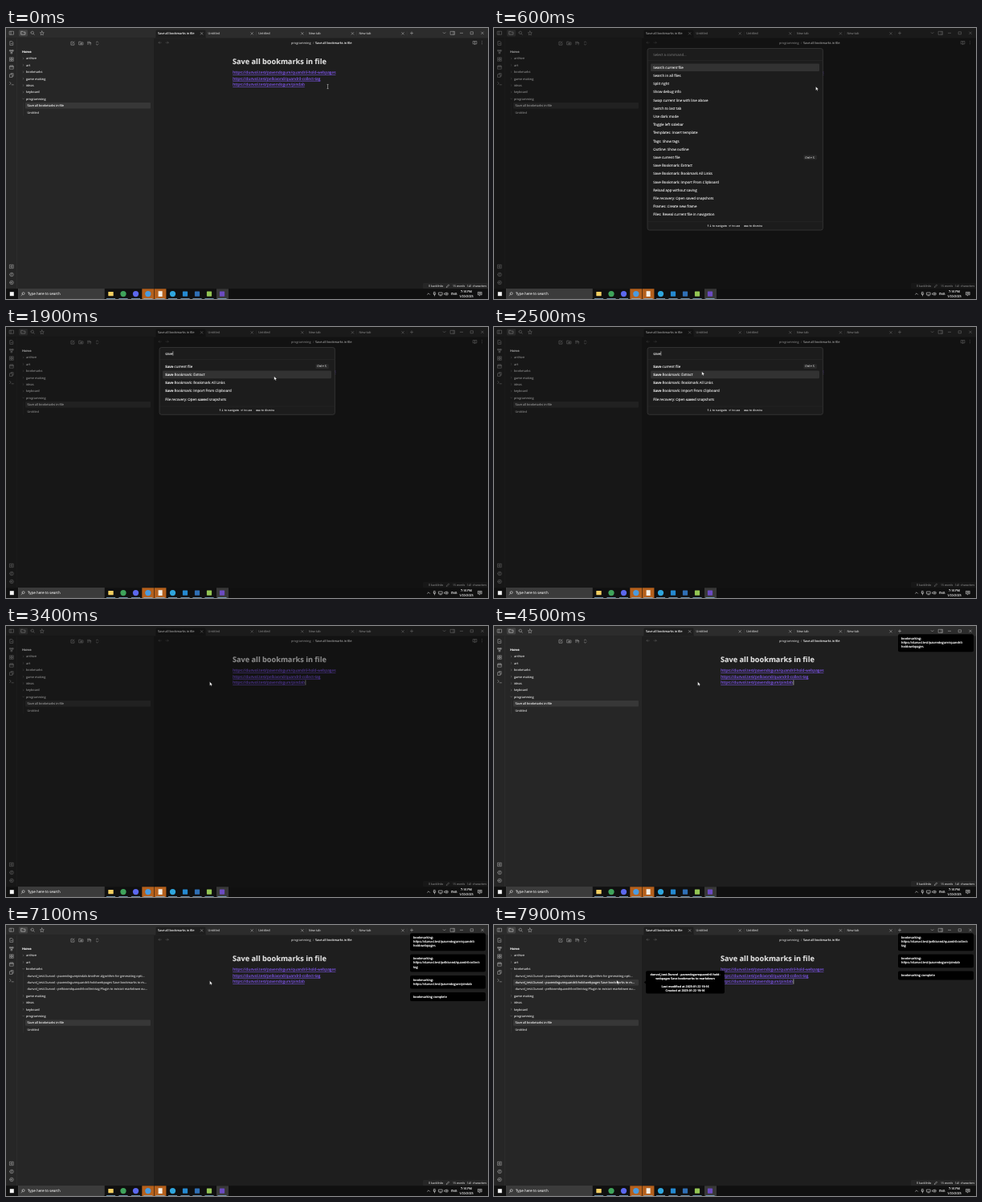
An HTML page that plays this animation: 600x338 px, repeating every 8 s.

```html
<!DOCTYPE html>
<html lang="en">
<head>
<meta charset="utf-8">
<title>Bookmarking links from a note</title>
<style>
  html, body { margin: 0; width: 100%; height: 100%; overflow: hidden; background: #1e1e1e; }
  svg { display: block; width: 100vw; height: 100vh; }
  text {
    font-family: "Open Sans", "Noto Sans", "DejaVu Sans", sans-serif;
    text-rendering: geometricPrecision; white-space: pre;
    stroke: currentColor; stroke-width: .11; fill: currentColor;
  }
  .bold { font-weight: 700; }
  .icon { fill: none; stroke: #b4b4b4; stroke-width: .52; stroke-linecap: round; stroke-linejoin: round; }
</style>
</head>
<body>
<svg id="stage" viewBox="0 0 600 338"></svg>
<script>
const LOOP = 8000, ROW = 8.4, ITEM = 10.2;
const UI = 3.86, BODY = 4.77, MENU = 4.45;

const text = (x, y, s, size = UI, color = '#d0d0d0', extra = '') =>
  `<text x="${x}" y="${y}" font-size="${size}" color="${color}" ${extra}>${s}</text>`;
const rect = (x, y, w, h, fill, r = 0, extra = '') =>
  `<rect x="${x}" y="${y}" width="${w}" height="${h}" rx="${r}" fill="${fill}" ${extra}/>`;
const dot = (x, y, r, fill) => `<circle cx="${x}" cy="${y}" r="${r}" fill="${fill}"/>`;
const icon = (x, y, d, extra = '') =>
  `<path class="icon" transform="translate(${x} ${y})" d="${d}" ${extra}/>`;
const group = (id, content = '') => `<g id="${id}">${content}</g>`;

const CROSS = 'M-1.3-1.3L1.3 1.3M1.3-1.3L-1.3 1.3';
const PLUS = 'M-1.6 0H1.6M0-1.6V1.6';
const FOLDER = 'M-2.4-1.9h1.7l.7.8h2.4v3h-4.8z';
const RIGHT = 'M-.5-.9L.5 0L-.5 .9';
const DOWN = 'M-.9-.5L0 .5L.9-.5';
const PANEL = 'M-2.5-2h5v4h-5z';
const SHEET = 'M-1.8-2.4h2.3l1.3 1.3v3.5h-3.6z';
const RING = 'M-2.3 0a2.3 2.3 0 1 0 4.6 0a2.3 2.3 0 1 0-4.6 0';

// Stand-in addresses
const HOST = 'https://dunvol.test/';
const USER = 'pavendogure', OTHER = 'pelkivond';
const REPO = 'quandril-hold-webpages', REF = 'quandril-collect-tag', TOOL = 'pindab';
const SITE = 'dunvol_test.Dunvol - ';
const links = [`${USER}/${REPO}`, `${OTHER}/${REF}`, `${USER}/${TOOL}`].map(s => HOST + s);
const saved = {
  tool: `${SITE}${USER}${TOOL} Another algorithm for generating opti...`,
  keep: `${SITE}${USER}${REPO} Save bookmarks to m...`,
  ref: `${SITE}${OTHER}${REF} Plugin to extract markdown ou...`
};
const NOTE = 'Save all bookmarks in file';

function titleBar() {
  const tabs = [NOTE, 'Untitled', 'Untitled', 'New tab', 'New tab'];
  return rect(0, 0, 600, 12.5, '#2c2c2c') +
    rect(16, 2.2, 11, 8.2, '#424242', 1.4) +
    icon(7, 6.2, PANEL + 'M-.9-2v4') + icon(21.5, 6.2, FOLDER, 'style="stroke:#e0e0e0"') +
    icon(33, 6.2, 'M-2-.4a1.7 1.7 0 1 0 3.4 0a1.7 1.7 0 1 0-3.4 0M1 .9L2.3 2.2') +
    icon(44.8, 6.4, 'M0-2.5L.8-.8L2.5-.6L1.2.6L1.5 2.4L0 1.5L-1.5 2.4L-1.2.6L-2.5-.6L-.8-.8z') +
    '<path d="M185 12.5q1.5 0 1.5-1.5V4q0-1.5 1.5-1.5h59q1.5 0 1.5 1.5v7q0 1.5 1.5 1.5z" fill="#1e1e1e"/>' +
    tabs.map((s, i) => {
      const x = 189 + i * 62.6;
      return text(x, 8.3, s, UI, i ? '#b8b8b8' : '#ececec') + icon(x + 54.6, 6.8, CROSS) +
        (i ? rect(x + 59.5, 4, .4, 5.5, '#444') : '');
    }).join('') +
    icon(505, 6.4, PLUS) + icon(545.6, 6.3, 'M-1.4-.7L0 .7L1.4-.7') +
    icon(556, 6.3, PANEL + 'M.9-2v4') + icon(567, 6.3, 'M-1.6 0H1.6') +
    icon(580, 6.3, 'M-1.5-1.5h3v3h-3z') + icon(593, 6.3, CROSS);
}

function sideBar() {
  const ribbon = [
    [19, SHEET + 'M-.7 .3h1.5'],
    [29.5, 'M-2.2-2h1.4v1.4h-1.4zM.8-2h1.4v1.4H.8zM-.7 1h1.4v1.4h-1.4zM-.8-1.3H.8M-1.5-.6L-.2 1M1.5-.6L.2 1'],
    [39, 'M-2.2-2.2h1.8v1.8h-1.8zM.5-2.2h1.8v1.8H.5zM-2.2 .5h1.8v1.8h-1.8zM.5 .5h1.8v1.8H.5z'],
    [49, 'M-2.2-1.8h4.4v4h-4.4zM-2.2-.5h4.4M-1-2.5v1M1-2.5v1'],
    [59, 'M-2.1-1.2h3v3.6h-3zM-.9-1.2v-1.2h3v3.6H.9'],
    [69, 'M-2.3-1.6L-.8 0L-2.3 1.6M.2 1.8H2.3'],
    [297.5, 'M-2.2-2.2h4.4v4.4h-4.4zM-1 0a1 1 0 1 0 2 0a1 1 0 1 0-2 0'],
    [307.5, RING + 'M-.7-.6q.7-1 1.3-.2q.2.6-.6 1M0 1.1v.1'],
    [317.5, RING + 'M-.8 0a.8.8 0 1 0 1.6 0a.8.8 0 1 0-1.6 0']
  ];
  const tools = [
    [83, 'M.3-1.8h-2.4v4h4V-.2M-.6.7L2-2'],
    [93.5, FOLDER + 'M0-.4v1.8M-.9.5h1.8'],
    [103.5, 'M-2-1.7h3M-2-.3h2M-2 1.1h1M1.6-.8v2.8M.7-.1L1.6-1L2.4-.1'],
    [113.5, 'M-1.2-1L0-2.2L1.2-1M-1.2 1L0 2.2L1.2 1']
  ];
  return rect(0, 12.5, 184, 313, '#262626') + rect(13.3, 12.5, .4, 313, '#363636') +
    ribbon.map(([y, d]) => icon(7, y, d)).join('') +
    tools.map(([x, d]) => icon(x, 19, d)).join('') +
    text(20, 30.8, 'Home', UI, '#ececec', 'class="bold"') + group('tree');
}

function folder(name, y, open) {
  return icon(21.6, y, open ? DOWN : RIGHT, 'style="stroke-width:.4;stroke:#8a8a8a"') + text(25, y + 1.45, name);
}

function fileRow(name, y, back) {
  return (back ? rect(24, y - 3.7, 156, 7.5, back, 1) : '') +
    text(26.5, y + 1.45, name, UI, back ? '#ececec' : '#c8c8c8');
}

const guide = (y, n) => rect(21.5, y + 4.2, .35, n * ROW, '#3c3c3c');

function tree(count, hover) {
  const names = ['archive', 'art', 'bookmarks', 'game making', 'ideas', 'keyboard', 'programming'];
  const { tool, keep, ref } = saved;
  const kids = [[], [keep], [keep, ref], [tool, keep, ref]][count];
  const at = i => 38 + i * ROW + (i > 2 ? count * ROW : 0);
  return guide(at(2), count) + guide(at(6), 2) +
    names.map((s, i) => folder(s, at(i), i === 6 || (i === 2 && count > 0))).join('') +
    kids.map((s, i) => fileRow(s, at(2) + (i + 1) * ROW, hover && i === 1 ? '#363636' : '')).join('') +
    fileRow(NOTE, at(6) + ROW, '#373737') + fileRow('Untitled', at(6) + 2 * ROW);
}

function editor() {
  return icon(191.6, 18.2, 'M1.6 0H-1.6M-.4-1.2L-1.6 0L-.4 1.2', 'opacity=".4"') +
    icon(200.6, 18.2, 'M-1.6 0H1.6M.4-1.2L1.6 0L.4 1.2', 'opacity=".4"') +
    text(355, 19.5, 'programming', UI, '#b0b0b0') + text(382, 19.5, '/', UI, '#777') +
    text(385, 19.5, NOTE, UI, '#ececec') +
    icon(583.6, 18.3, 'M0-1.4v3.4M0-1.4q-1-.7-2.3-.4v3.4q1.3-.3 2.3.4q1-.7 2.3-.4v-3.4q-1.3-.3-2.3.4') +
    [-1.6, 0, 1.6].map(d => dot(592.5, 18.3 + d, .4, '#bbb')).join('') +
    text(282, 45, NOTE, 9.17, '#e0e0e0', 'class="bold"') +
    links.map((s, i) => text(282.3, 57.4 + i * 7.5, s, BODY, '#8459f5', 'text-decoration="underline"')).join('') +
    group('caret', rect(372.6, 67.4, .6, 6.3, '#e4e4e4')) +
    rect(519, 318, 81, 7.5, '#262626', 1.5) +
    text(526, 323.1, '0 backlinks', 3.58, '#b8b8b8') +
    icon(550, 321.7, 'M-1.6 1.6L-1.3.4L.9-1.7L1.7-.9L-.4 1.3z') +
    text(556, 323.1, '15 words', 3.58, '#b8b8b8') + text(573.7, 323.1, '141 characters', 3.58, '#b8b8b8');
}

function taskBar() {
  const white = 'style="stroke:#f0f0f0"';
  const rounds = [[146, '#3fa45b'], [161.5, '#5c68ee'], [176.8, '#4b9be0'], [207.5, '#2fa6de']];
  const squares = [[223, '#2489d1'], [238, '#2f6fb5'], [253, '#93c653'], [269, '#6c4bc1']];
  const running = [130.5, 192, ...rounds.map(r => r[0]), ...squares.map(s => s[0])];
  return rect(0, 325.2, 600, 12.8, '#101010') +
    rect(4.8, 329.2, 5, 5, '#f4f4f4') +
    rect(15.2, 325.5, 107, 12.3, '#3b3b3b', 0, 'stroke="#575757" stroke-width=".4"') +
    icon(21, 331.6, 'M-.9-.5a1.5 1.5 0 1 0 3 0a1.5 1.5 0 1 0-3 0M-.4.6L-2 2.1', white) +
    text(27, 333.3, 'Type here to search', 4.46, '#d8d8d8') +
    rect(169.3, 325.3, 15, 12.7, '#b5601c') + rect(184.8, 325.3, 14.6, 12.7, '#b5601c') +
    rect(262, 325.3, 15, 12.7, '#383838') +
    running.map(x => rect(x - 5.6, 337.3, 11.2, .7, '#8fbfe2')).join('') +
    rect(127.3, 329, 6.4, 5.2, '#f3cf62', .4) +
    rounds.map(([x, c]) => dot(x, 331.6, 3.6, c)).join('') +
    rect(189.6, 328.2, 5, 6.8, '#f4efe6') +
    squares.map(([x, c]) => rect(x - 3.1, 328.5, 6.2, 6.2, c, .6)).join('') +
    icon(526, 331.6, 'M-1.5.7L0-.8L1.5.7', white) +
    icon(533.5, 331.6, 'M-.7-2.2h1.4v2.7h-1.4zM-1.5.2q1.5 2.2 3 0M0 1.4v1', white) +
    icon(541, 331.6, 'M-2.2-1.6h4.4v2.8h-4.4zM-1 2.2h2', white) +
    icon(548, 331.6, 'M-2-.7h1l1.2-1.1v3.6L-1 .7h-1zM1-.8q.7.8 0 1.6M1.8-1.5q1.3 1.5 0 3', white) +
    text(557.7, 333, 'ENG', 3.7, '#f4f4f4', 'text-anchor="middle"') +
    text(573, 330.2, '7:16 PM', 3.7, '#f4f4f4', 'text-anchor="middle"') +
    text(573, 336.2, '1/22/2023', 3.7, '#f4f4f4', 'text-anchor="middle"') +
    icon(590, 331.4, 'M-2.2-2h4.4v3.4H.6L-.6 2.6V1.4h-1.6zM-1.2-.8h2.4M-1.2.3h2.4', white);
}

const hits = [
  'Save current file', 'Save Bookmark: Extract', 'Save Bookmark: Bookmark All Links',
  'Save Bookmark: Import From Clipboard', 'Reload app without saving',
  'File recovery: Open saved snapshots', 'Frames: Create new frame',
  'Files: Reveal current file in navigation'
];
const others = [
  'Search current file', 'Search in all files', 'Split right', 'Show debug info',
  'Swap current line with line above', 'Switch to last tab', 'Use dark mode', 'Toggle left sidebar',
  'Templates: Insert template', 'Tags: Show tags', 'Outline: Show outline'
];

function commands(query) {
  if (!query) return [...others, ...hits];
  if (query.length < 3) return [...hits, ...others];
  return query === 'save' ? hits.filter(s => s.toLowerCase().includes(query)) : hits;
}

// Bold the whole match, or its letters one by one
function mark(s, query) {
  const bold = part => `<tspan class="bold">${part}</tspan>`;
  const at = s.toLowerCase().indexOf(query), n = query.length;
  if (at >= 0) return s.slice(0, at) + (n ? bold(s.slice(at, at + n)) : '') + s.slice(at + n);
  let k = 0;
  return [...s].map(c => c.toLowerCase() === query[k] ? (k++, bold(c)) : c).join('');
}

function palette(query, selected, caretOn) {
  const list = commands(query);
  const foot = 49 + (list.length - 1) * ITEM + 14.2;
  const typed = [0, 2.13, 4.62, 6.86, 9.37][query.length];
  const hint = (x, key, rest) => text(x, foot + 1.2, `<tspan class="bold">${key}</tspan> ${rest}`, 3.5, '#c4c4c4');
  return rect(191, 25.5, 218.4, foot - 20.2, '#1c1c1c', 2.5, 'stroke="#444" stroke-width=".6"') +
    rect(191.3, 40.4, 217.8, .35, '#333') + rect(191.3, foot - 5.2, 217.8, .35, '#303030') +
    (query ? text(198.2, 34.6, query, MENU, '#e4e4e4')
           : text(198.2, 34.6, 'Select a command...', MENU, '#666')) +
    (caretOn ? rect(198.3 + typed, 30.3, .5, 5.4, '#eee') : '') +
    rect(195, 44.4 + selected * ITEM, 210, 9.7, '#323232', 1.4) +
    list.map((s, i) => {
      const y = 50.7 + i * ITEM;
      return text(198.2, y, mark(s, query), MENU, '#e8e8e8') + (s === hits[0]
        ? rect(385.4, y - 4.4, 16.4, 5.8, '#292929', 1) + text(387.2, y - .3, 'Ctrl + S', 3.5, '#d0d0d0') : '');
    }).join('') +
    hint(265, '↑↓', 'to navigate') + hint(292.3, '↵', 'to use') + hint(311.3, 'esc', 'to dismiss');
}

const notices = [
  { from: 3600, to: 7600, y: 10.2, h: 22, lines: ['bookmarking:', `${HOST}${USER}/quandril-`, 'hold-webpages'] },
  { from: 4600, y: 36.6, h: 22, lines: ['bookmarking:', `${HOST}${OTHER}/quandril-collect-`, 'tag'] },
  { from: 5200, y: 63, h: 16.6, lines: ['bookmarking:', links[2]] },
  { from: 5800, y: 84, h: 11, lines: ['bookmarking complete'] }
];

function notice({ y, h, lines }, i) {
  return group('notice' + i, rect(503, y, 94, h, '#000', 2) +
    lines.map((s, k) => text(507, y + 6.5 + k * 5.3, s, 3.88, '#fff', 'style="stroke-width:.16"')).join(''));
}

function tooltip() {
  const lines = [`${SITE}${USER}quandril-hold-`, 'webpages Save bookmarks to markdown', '',
    'Last modified at 2023-01-22 19:16', 'Created at 2023-01-22 19:16'];
  return rect(189, 57.3, 98, 28.2, '#000', 2) + '<path d="M189.2 69.5L186.8 71.5L189.2 73.5z"/>' +
    lines.map((s, i) => text(238, 62.9 + i * 5.07, s, 3.62, '#fff', 'class="bold" text-anchor="middle"')).join('');
}

const arrow = '<path d="M0 0V4.9L1.15 3.85L1.9 5.5L2.7 5.15L1.95 3.55H3.5z" fill="#fff" stroke="#000" stroke-width=".3"/>';
const beam = '<path d="M-1-2.6h2M0-2.6v5.2M-1 2.6h2" fill="none" stroke="#d8d8d8" stroke-width=".5"/>';

const stage = document.getElementById('stage');
stage.innerHTML = rect(0, 0, 600, 338, '#1e1e1e') + titleBar() + sideBar() + editor() +
  group('dim', rect(0, 0, 600, 325.2, '#000')) + group('palette') +
  notices.map(notice).join('') + group('tooltip', tooltip()) + taskBar() +
  group('beam', beam) + group('arrow', arrow);

const el = id => document.getElementById(id);
const show = (id, on) => el(id).style.opacity = Number(on);
const clamp = v => Math.min(1, Math.max(0, v));
const between = (t, a, b) => t >= a && t < b;
const latest = (steps, t) => steps.filter(([at]) => t >= at).pop()[1];

const drawn = {};
function fill(id, key, draw) {
  if (drawn[id] === key) return;
  drawn[id] = key;
  el(id).innerHTML = draw();
}

const pointerPath = [
  [0, 400.5, 73], [1700, 400.5, 73], [2100, 268, 50], [2300, 268, 50], [2500, 258.7, 55.5],
  [2900, 258.7, 55.5], [3200, 253.6, 69.6], [7400, 253.6, 69.6], [7700, 152.8, 68.8], [LOOP, 152.8, 68.8]
];
function pointer(t) {
  const i = pointerPath.findIndex(p => p[0] > t);
  const [t0, x0, y0] = pointerPath[i - 1], [t1, x1, y1] = pointerPath[i];
  const u = (t - t0) / (t1 - t0), k = u * u * (3 - 2 * u);
  return [x0 + (x1 - x0) * k, y0 + (y1 - y0) * k];
}

const typing = [[0, ''], [1100, 's'], [1200, 'sa'], [1400, 'sav'], [1500, 'save']];
const savedCount = [[0, 0], [4600, 1], [5200, 2], [5800, 3]];
const caretSteps = [[0, 0], [3400, 1], [3900, 0], [4500, 1], [5000, 0], [5500, 1], [6100, 0], [6600, 1], [7100, 0], [7600, 1]];
const promptCaret = [[0, 1], [600, 0], [1100, 1], [2000, 0], [2500, 1], [3000, 0]];

function render(t) {
  const [x, y] = pointer(t);
  const open = between(t, 200, 3400);

  show('dim', .4 * clamp((t - 100) / 200) * clamp((3600 - t) / 200));
  show('palette', open);
  if (open) {
    const query = latest(typing, t), caretOn = latest(promptCaret, t);
    const selected = t > 1700 ? Math.min(4, Math.max(0, Math.floor((y - 44.2) / ITEM))) : 0;
    fill('palette', `${query}|${selected}|${caretOn}`, () => palette(query, selected, caretOn));
  }

  const count = latest(savedCount, t), hover = t > 7400 && x < 180;
  fill('tree', `${count}|${hover}`, () => tree(count, hover));
  show('caret', latest(caretSteps, t));
  show('tooltip', t >= 7850);

  notices.forEach(({ from, to = LOOP }, i) => {
    show('notice' + i, between(t, from, to) ? clamp((t - from + 50) / 150) : 0);
    el('notice' + i).setAttribute('transform', `translate(0 ${t >= 7600 ? -26.4 : 0})`);
  });

  show('beam', t < 200);
  show('arrow', t >= 200);
  for (const id of ['beam', 'arrow']) el(id).setAttribute('transform', `translate(${x} ${y})`);
}

const start = performance.now();
function tick() {
  render(Math.max(0, performance.now() - start) % LOOP);
  requestAnimationFrame(tick);
}
tick();
</script>
</body>
</html>
```
